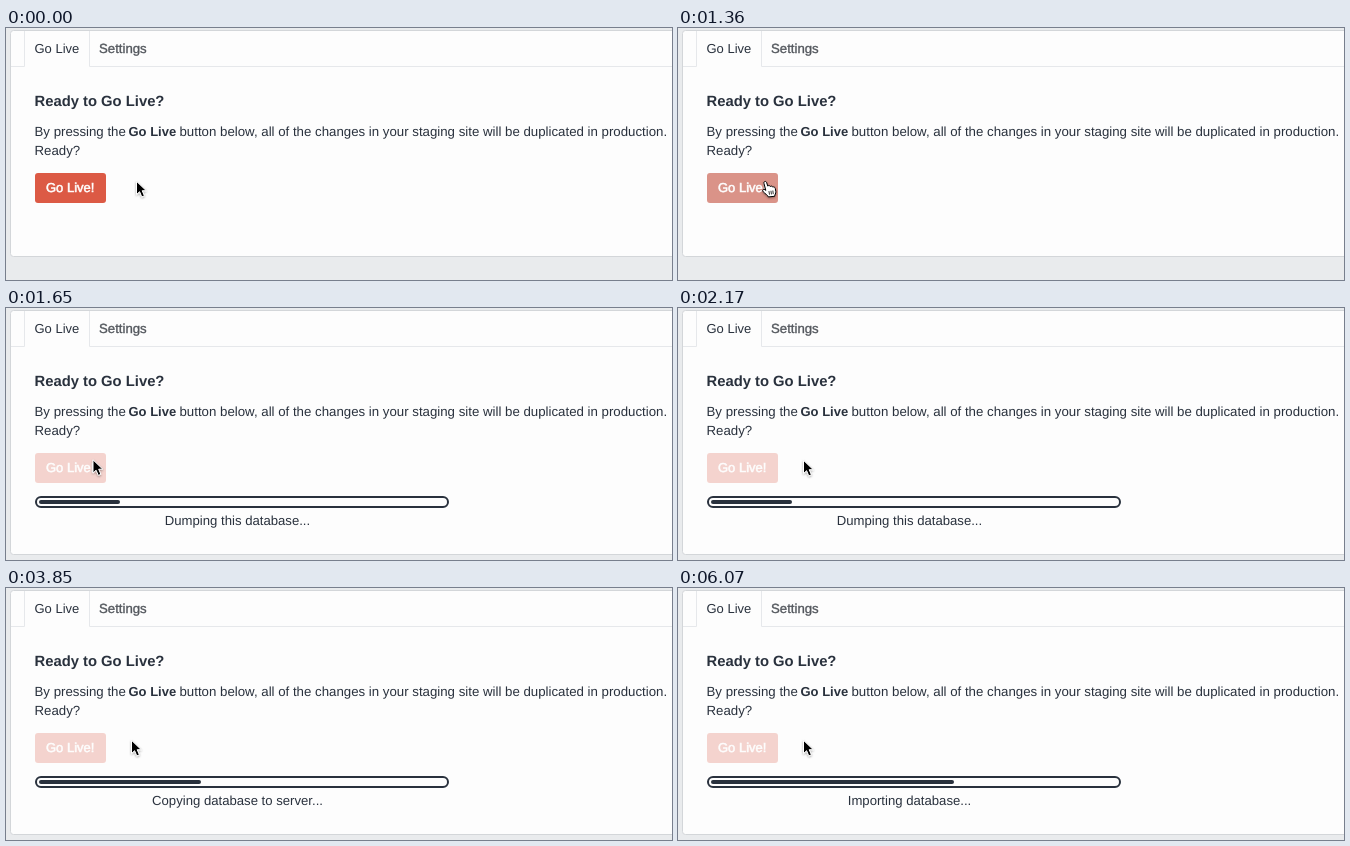
An HTML page that plays this animation: 666 by 252 pixels, repeating every 8000 ms.

```html
<!DOCTYPE html>
<html lang="en">
<head>
<meta charset="utf-8">
<title>Go Live</title>
<style>
  html, body { margin: 0; width: 100%; height: 100%; overflow: hidden; background: #e9ebed; }
  svg { display: block; width: 666px; height: 252px; }
  text {
    font: 13.25px "Liberation Sans", Arial, sans-serif;
    fill: #29313d;
    text-rendering: geometricPrecision;
    white-space: pre;
  }
  .bold { font-weight: bold; font-size: 13px; }
  .title { font-weight: bold; font-size: 14.8px; }
  .tab { font-size: 13px; }
  .idle { font-size: 13.2px; fill: #53575d; stroke: #53575d; stroke-width: .35px; }
  .label { font-size: 13px; fill: #fff; stroke: #fff; stroke-width: .55px; }
  .status { font-size: 13.15px; text-anchor: middle; }
  .rule { fill: none; stroke: #e6e8eb; }
</style>
</head>
<body>
<svg viewBox="0 0 666 252">
  <defs>
    <filter id="soft" x="-50%" y="-50%" width="200%" height="200%">
      <feDropShadow dx="0" dy="1" stdDeviation="1" flood-opacity=".35"/>
    </filter>
  </defs>
  <rect width="666" height="252" fill="#e9ebed"/>
  <rect id="panel" x="4.5" y="2.5" width="680" height="226" rx="3" fill="#fdfdfd" stroke="#d3d6d9"/>
  <path class="rule" d="M5 38.5H18.5V3M83.5 3V38.5H666"/>

  <text class="tab" x="28.5" y="25">Go Live</text>
  <text class="idle" x="93" y="25">Settings</text>
  <text class="title" x="28.5" y="78">Ready to Go Live?</text>
  <text x="28.5" y="108">By pressing the</text>
  <text class="bold" x="122.5" y="108">Go Live</text>
  <text x="173.5" y="108">button below, all of the changes in your staging site will be duplicated in production.</text>
  <text x="28.5" y="127">Ready?</text>

  <g id="button">
    <rect id="face" x="29" y="145" width="71" height="30" rx="3"/>
    <text class="label" x="40" y="164">Go Live!</text>
  </g>

  <g id="progress">
    <rect x="30" y="189" width="412" height="10" rx="5" fill="#fdfdfd" stroke="#29313d" stroke-width="2"/>
    <rect id="fill" x="33" y="192" height="4" rx="2" fill="#29313d"/>
    <text id="status" class="status" x="231.5" y="217"></text>
  </g>

  <g id="cursor" filter="url(#soft)">
    <path id="arrow" fill="#000" stroke="#fff" stroke-linejoin="round"
      d="M0 .3V13.6L3.1 10.7L5.3 15.9L7.9 14.8L5.7 9.7H9.8Z"/>
    <g id="hand" transform="translate(-3.6 1)" stroke="#000" stroke-linejoin="round" stroke-linecap="round">
      <path fill="#fff" d="M4.3 9.5L2.6 3C2 .8 4.6 .2 5.2 2L6.4 5.6C7.2 4.6 8.6 5 8.9 6C9.8 5.2 11 5.6 11.3 6.6C12.3 6 13.6 6.6 13.9 8L14.4 11C14.6 13 13.4 14 13.2 15.8L7 16.4C6.4 14.6 3.8 13.4 1.8 11.2C.4 9.4 2 8 4.3 9.5Z"/>
      <path fill="none" stroke-width=".8" d="M7.6 11L8.1 13.8M9.6 10.7L10 13.5M11.5 10.4L11.8 13.2"/>
    </g>
  </g>
</svg>
<script>
const LOOP = 8000;
const $ = id => document.getElementById(id);
const mix = (a, b, p) => a + (b - a) * p;
const ease = p => p * p * (3 - 2 * p);

// Stepped progress: the first step shows at `start`, the last at `end`.
function steps(t, start, end, count) {
  if (t < start) return 0;
  const k = Math.floor((t - start) / (end - start) * (count - 1) + 1e-6) + 1;
  return Math.min(1, k / count);
}

// Launch sequence: time, button opacity, panel growth, progress opacity, first fill.
const launch = [
  [0, 1, 0, 0, 0],
  [1360, .6, 0, 0, 0],
  [1420, .35, .5, 0, 0],
  [1480, .25, 1, 0, 0],
  [1540, .25, 1, .5, .4],
  [1590, .25, 1, 1, .8],
  [1650, .25, 1, 1, 1]
];
const messages = [
  [0, "Dumping this database..."],
  [3730, "Copying database to server..."],
  [5950, "Importing database..."]
];
const at = (table, t) => table.filter(row => row[0] <= t).pop();

function draw(t) {
  const [, opacity, grow, shown, first] = at(launch, t);
  const approach = ease(steps(t, 420, 830, 8));
  const leave = ease(steps(t, 2000, 2170, 4));
  const x = mix(mix(130.5, 87, approach), 125.5, leave);
  const y = mix(mix(153, 151.5, approach), 152, leave);
  const hover = x < 100 && t < 1420;

  $("cursor").setAttribute("transform", `translate(${x} ${y})`);
  $("arrow").style.display = hover ? "none" : "";
  $("hand").style.display = hover ? "" : "none";
  $("face").setAttribute("fill", hover ? "#c34e3b" : "#dc5a45");
  $("button").setAttribute("opacity", opacity);
  $("panel").setAttribute("height", 226 + 18 * grow);
  $("progress").setAttribute("opacity", shown);

  const stage = first + ease(steps(t, 3730, 3850, 3)) + ease(steps(t, 5950, 6070, 3));
  $("fill").setAttribute("width", 81 * stage);
  $("status").textContent = at(messages, t)[1];
}

const begun = performance.now();
function frame(now) {
  draw(Math.max(0, now - begun) % LOOP);
  requestAnimationFrame(frame);
}
draw(0);
requestAnimationFrame(frame);
</script>
</body>
</html>
```
